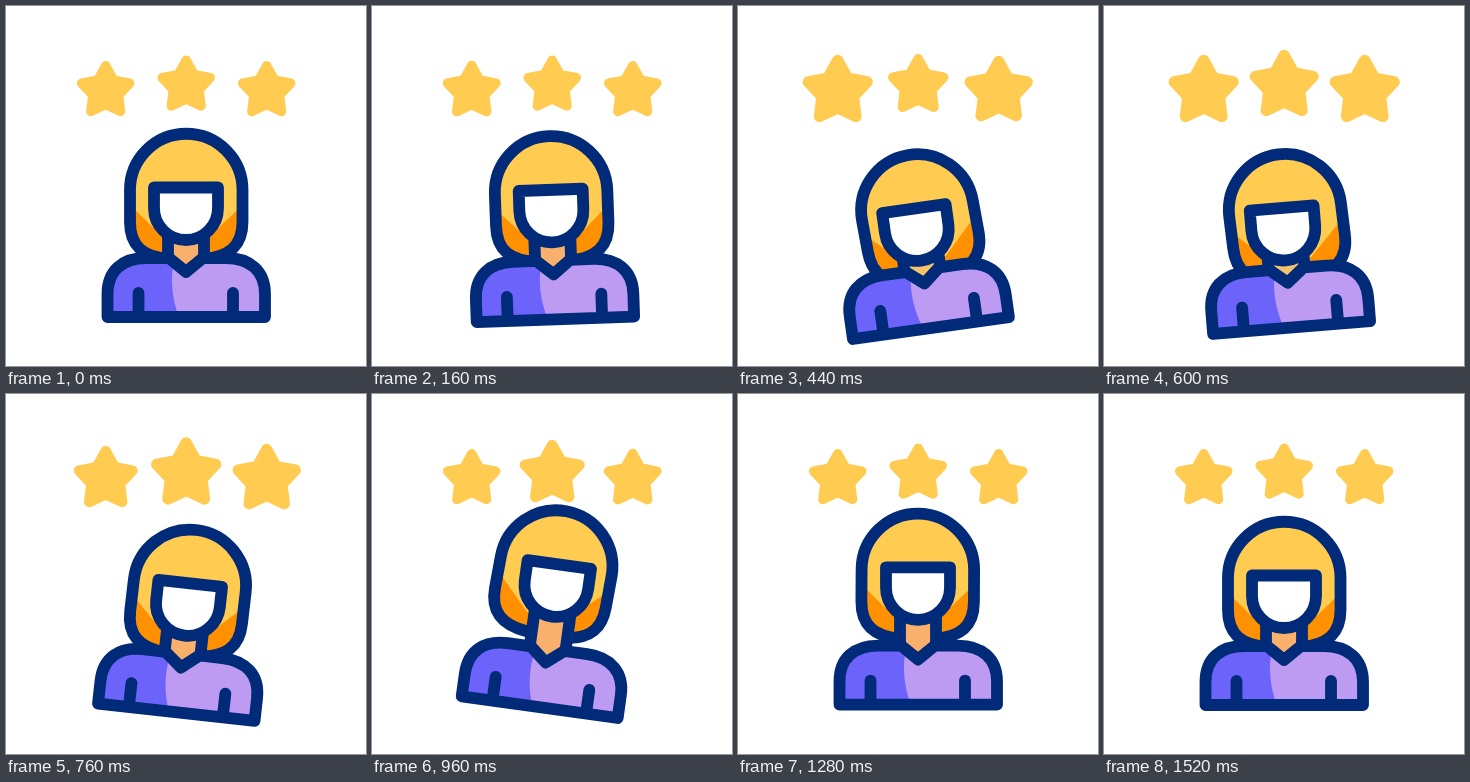
Write an HTML page that moves like this. It is 360 px wide and 360 px high and loops after 1.72 s.

```html
<!DOCTYPE html>
<html lang="en">
<head>
<meta charset="utf-8">
<title>Three star customer</title>
<style>
  html, body { margin: 0; width: 100%; height: 100%; overflow: hidden; background: #fff; }
  svg { display: block; width: 100vw; height: 100vh; }
  .line { fill: none; stroke: #012a78; stroke-width: 11.8; stroke-linecap: round; stroke-linejoin: round; }
  .star { fill: #ffcb51; stroke: #ffcb51; stroke-width: 9.4; stroke-linejoin: round; }
</style>
</head>
<body>
<svg viewBox="0 0 360 360">
  <g id="stars"></g>
  <g id="person">
    <g id="hair">
      <path fill="#ffcb51" d="M163 253C138 251 124 241 124 216V184A56.250 56.250 0 0 1 236.500 184V216C236.500 241 222 251 197 253Z"/>
      <path fill="#ff9100" d="M124 199L160 234H200L236.500 199V216C236.500 241 222 251 197 253H163C138 251 124 241 124 216Z"/>
      <path class="line" d="M163 253C138 251 124 241 124 216V184A56.250 56.250 0 0 1 236.500 184V216C236.500 241 222 251 197 253"/>
    </g>
    <path id="neck" class="line" d="M162 206V252L180 266L198 252V206"/>
    <path id="face" class="line" style="fill:#fff" d="M148 181.500H212V202A32 32 0 0 1 148 202Z"/>
    <path fill="#6c63fb" d="M101.500 311V288C101.500 265 116 252 140 252H163L180 266V311Z"/>
    <path fill="#bd9bf2" d="M168 256C164 272 166 294 173 311H259V288C259 265 244 252 220 252H197L180 266Z"/>
    <path class="line" d="M101.500 311V288C101.500 265 116 252 140 252H163L180 266L197 252H220C244 252 259 265 259 288V311ZM132.500 287V311M227 287V311"/>
  </g>
</svg>
<script>
const LOOP = 1720, STEP = 40;
const [starGroup, person, hair, neck, face] =
  ['stars', 'person', 'hair', 'neck', 'face'].map(id => document.getElementById(id));

// [time, value] keys, eased in and out between neighbours
const tilt = [[40, 0], [400, -8], [500, -8], [830, 8], [940, 8], [1280, 0]];
const sink = [[40, 0], [450, 12], [1240, -0.5], [1500, 0]];
const nod = [[160, 0], [520, 10], [560, 10], [1020, -15.5], [1060, -15.5], [1500, 0]];
const pulse = start => [[start, 1], [start + 320, 1.22], [start + 480, 1.22], [start + 800, 1]];

function track(keys, t) {
  const next = keys.findIndex(key => key[0] > t);
  if (next === 0) return keys[0][1];
  if (next < 0) return keys[keys.length - 1][1];
  const [t0, a] = keys[next - 1], [t1, b] = keys[next];
  return a + (b - a) * (1 - Math.cos(Math.PI * (t - t0) / (t1 - t0))) / 2;
}

const starPoints = Array.from({ length: 10 }, (_, i) => {
  const radius = i % 2 ? 13.5 : 25.3, angle = i * Math.PI / 5;
  return [radius * Math.sin(angle), 2 - radius * Math.cos(angle)].map(v => v.toFixed(2));
}).join(' ');

const stars = [[99.7, 83, 120], [180.2, 77.5, 340], [260.7, 83, 200]].map(([x, y, start]) => {
  const el = document.createElementNS('http://www.w3.org/2000/svg', 'polygon');
  el.setAttribute('points', starPoints);
  el.setAttribute('class', 'star');
  starGroup.append(el);
  return { el, x, y, keys: pulse(start) };
});

const move = (el, transform) => el.setAttribute('transform', transform);

function draw(now) {
  const t = Math.floor(now % LOOP / STEP) * STEP;
  const drop = track(nod, t);
  const swing = 0.32 * track(tilt, t - 80); // hair trails behind the body
  move(person, `translate(0 ${track(sink, t)}) rotate(${track(tilt, t)} 180 220)`);
  move(hair, `translate(0 ${drop}) rotate(${swing} 180 115)`);
  move(face, `translate(0 ${drop})`);
  neck.style.fill = drop > 0 ? '#f5c36c' : '#f9b06c';
  for (const { el, x, y, keys } of stars) {
    move(el, `translate(${x} ${y}) scale(${track(keys, t)})`);
  }
  requestAnimationFrame(() => draw(performance.now()));
}
draw(performance.now());
</script>
</body>
</html>
```
